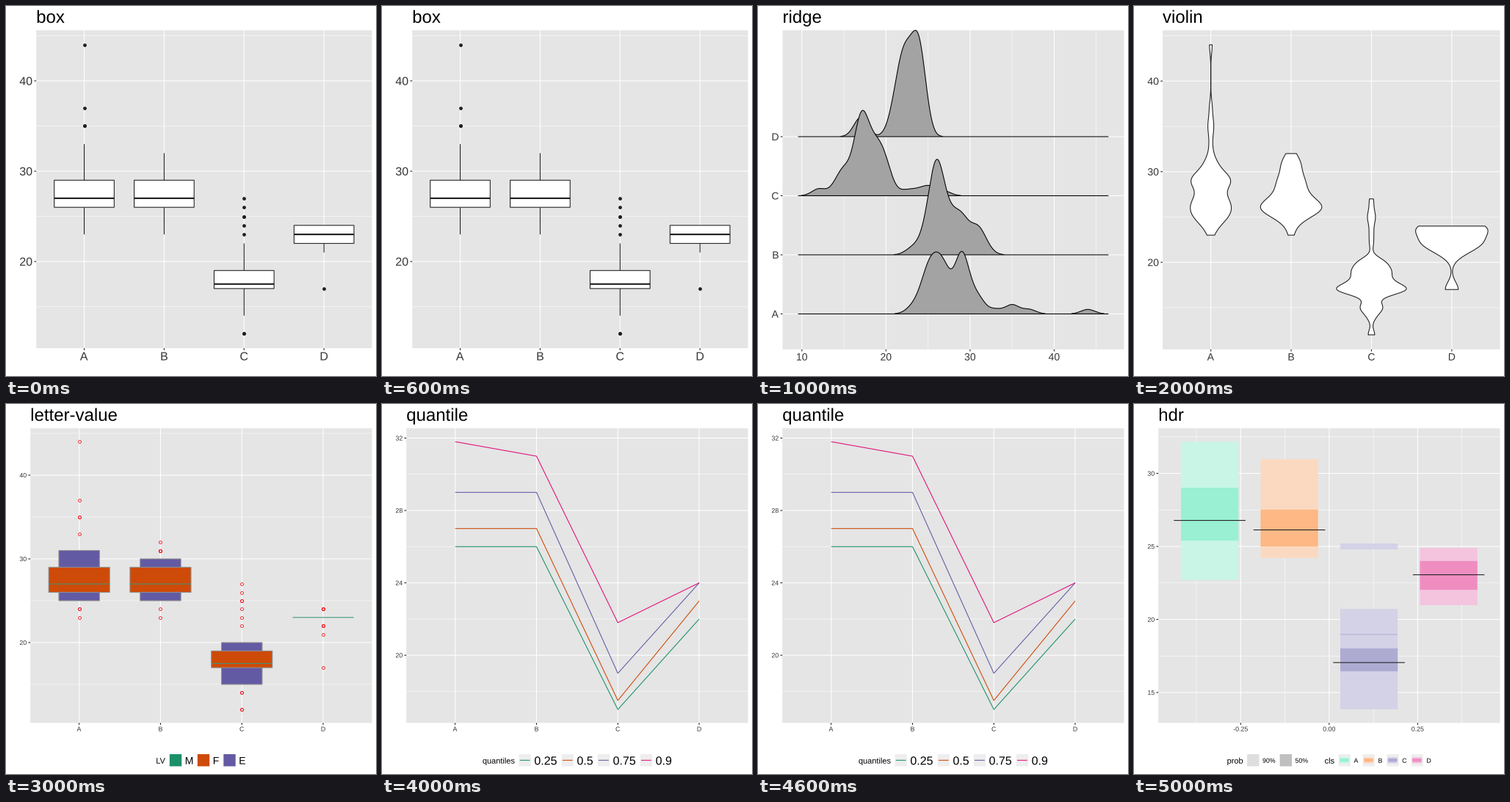
These frames come from a looping animation (504 by 504 pixels, 6 s). A matplotlib script:

```python
import numpy as np
import matplotlib.pyplot as plt
from matplotlib.animation import FuncAnimation
from matplotlib.colors import to_rgb
from matplotlib.patches import PathPatch, Polygon, Rectangle
from matplotlib.textpath import TextPath
from matplotlib.transforms import Affine2D

SIZE = 504
TOP, RIGHT = 33.1, 498.5
LINE, KEY = 1.07, 17.28
INK, TEXT, GREY, PALE = "#1f1f1f", "#363636", "#e5e5e5", "#eeeeee"
DARK = ["#1c9066", "#ce4a08", "#635aa4", "#e00f78"]
SOFT = ["#99f0d3", "#fdb886", "#aeabd3", "#ef8dc1"]

plt.rcParams.update({
    "font.family": "Liberation Sans",
    "path.snap": False,
    "lines.solid_capstyle": "butt",
})

# (rank, value) points; the sorted values between them are interpolated
POINTS = {
    "A": [(0, 23.2), (3, 24.55), (23, 27.43), (25, 28.6), (36, 29.4),
          (41, 31.4), (43, 35), (44, 35), (45, 37), (46, 44)],
    "B": [(0, 23), (1, 24.4), (5, 25.47), (19, 26.4), (33, 29.4),
          (36, 30.6), (40, 31.7)],
    "C": [(1, 12), (2, 14.15), (9, 15.45), (12, 16.6), (30, 17.45),
          (54, 20.28), (55, 22), (61, 27.2)],
    "D": [(0, 17), (1, 21.2), (9, 24.4), (10, 24.4)],
}
NAMES = list(POINTS)


def sample(points):
    rank, value = zip(*points)
    return np.round(np.interp(np.arange(rank[-1] + 1), rank, value))


DATA = [sample(p) for p in POINTS.values()]

fig = plt.figure(figsize=(7, 7), dpi=72, facecolor="white")
ax = fig.add_axes([0, 0, 1, 1])


def bandwidth(v):
    q1, q3 = np.percentile(v, [25, 75])
    return 0.9 * min(v.std(ddof=1), (q3 - q1) / 1.34) * len(v) ** -0.2


def density(v, x, bw):
    z = (x[:, None] - v) / bw
    return np.exp(-z * z / 2).sum(1) / (len(v) * bw * np.sqrt(2 * np.pi))


def scale(lo, hi, start, end):
    return lambda v: start + (v - lo) / (hi - lo) * (end - start)


def line(x, y, color=INK, lw=LINE, z=3):
    ax.plot(x, y, color=color, lw=lw, zorder=z)


def rect(x0, y0, x1, y1, fill, edge="none", lw=0.0, z=3):
    ax.add_patch(Rectangle((x0, y0), x1 - x0, y1 - y0, facecolor=fill,
                           edgecolor=edge, lw=lw, zorder=z))


def shape(x, y, fill, edge="none"):
    ax.add_patch(Polygon(np.column_stack([x, y]), closed=True, facecolor=fill,
                         edgecolor=edge, lw=LINE, zorder=3))


def label(x, y, s, size, color="black", align=0.0):
    """Text on baseline y; align 0 left, 0.5 centre, 1 right. Returns its end."""
    path = TextPath((0, 0), s, size=size)
    width = path.vertices[:, 0].max() + 0.05 * size
    x -= align * width
    move = Affine2D().scale(1, -1).translate(x, y)
    ax.add_patch(PathPatch(path, facecolor=color, lw=0, zorder=5,
                           transform=move + ax.transData))
    return x + width


def dots(x, ys, fill, edge):
    for y in ys:
        ax.plot([x], [y], "o", ms=3.9, mfc=fill, mec=edge, mew=0.75, zorder=4)


def panel(title, left, bottom, size, xticks, yticks, xminor=(), yminor=()):
    """Title, grey panel, grid, ticks and tick labels."""
    rect(left, TOP, RIGHT, bottom, GREY, z=0)
    for x in xminor:
        line([x, x], [TOP, bottom], "white", LINE / 2, 1)
    for y in yminor:
        line([left, RIGHT], [y, y], "white", LINE / 2, 1)
    for x, s in xticks:
        line([x, x], [TOP, bottom], "white", z=2)
        line([x, x], [bottom, bottom + 2.74])
        label(x, bottom + 4.94 + 0.72 * size, s, size, TEXT, 0.5)
    for y, s in yticks:
        line([left, RIGHT], [y, y], "white", z=2)
        line([left - 2.74, left], [y, y])
        label(left - 4.94, y + 0.358 * size, s, size, TEXT, 1)
    label(left, 22.9, title, 24)


def class_panel(title, left, bottom, size, lo=12, hi=44, major=(20, 41, 10)):
    """Panel with the groups along x; returns centres, step and y scale."""
    pad = 0.05 * (hi - lo)
    ys = scale(lo - pad, hi + pad, bottom, TOP)
    xs = scale(0.4, 4.6, left, RIGHT)
    centres = [xs(i + 1) for i in range(4)]
    ticks = np.arange(*major)
    half = major[2] / 2
    minor = [v for v in np.append(ticks - half, ticks[-1] + half)
             if lo - pad < v < hi + pad]
    panel(title, left, bottom, size, list(zip(centres, NAMES)),
          [(ys(v), str(v)) for v in ticks], yminor=[ys(v) for v in minor])
    return centres, xs(2) - xs(1), ys


def legend(x, title, names, size, paint):
    """One row: title, then a painted key and a name for every entry."""
    x = label(x, 489.7, title, 11) + 5
    for i, s in enumerate(names):
        paint(x, i)
        x = label(x + KEY + 4, 485.5 + 0.365 * size, s, size) + 5.5


def key(x, color):
    rect(x + 0.4, 477, x + KEY - 0.5, 493.5, color)


def box():
    centres, step, ys = class_panel("box", 41.2, 466.1, 16)
    half = 0.375 * step
    for x, v in zip(centres, DATA):
        q1, mid, q3 = np.percentile(v, [25, 50, 75])
        reach = 1.5 * (q3 - q1)
        far = (v < q1 - reach) | (v > q3 + reach)
        line([x, x], [ys(v[~far].min()), ys(q1)])
        line([x, x], [ys(q3), ys(v[~far].max())])
        rect(x - half, ys(q3), x + half, ys(q1), "white", INK, LINE)
        line([x - half, x + half], [ys(mid)] * 2, lw=2 * LINE, z=4)
        dots(x, ys(v[far]), INK, INK)


def ridge():
    left, bottom = 33.5, 467.7
    bw = np.mean([bandwidth(v) for v in DATA])
    lo, hi = 12 - 3 * bw, 44 + 3 * bw
    pad = 0.05 * (hi - lo)
    xs = scale(lo - pad, hi + pad, left, RIGHT)
    ys = scale(0.4, 5.8, bottom, TOP)
    panel("ridge", left, bottom, 14,
          [(xs(v), str(v)) for v in range(10, 41, 10)],
          [(ys(i + 1), s) for i, s in enumerate(NAMES)],
          xminor=[xs(v) for v in range(15, 46, 10)])
    grid = np.linspace(lo, hi, 512)
    curves = [density(v, grid, bw) for v in DATA]
    peak = np.max(curves)
    for i in (3, 2, 1, 0):
        base = ys(i + 1)
        y = ys(i + 1 + 1.8 * curves[i] / peak)
        shape(np.r_[xs(lo), xs(grid), xs(hi)], np.r_[base, y, base],
              "#a3a3a3")
        line([xs(lo), xs(hi)], [base, base], "black")
        # the flat tails are already covered by the base line
        line(xs(grid), np.where(base - y > 0.3, y, np.nan), "black")


def violin():
    centres, step, ys = class_panel("violin", 39.0, 467.7, 14)
    grids = [np.linspace(v.min(), v.max(), 512) for v in DATA]
    curves = [density(v, g, bandwidth(v)) for v, g in zip(DATA, grids)]
    peak = np.max(curves)
    for x, g, d in zip(centres, grids, curves):
        w = 0.45 * step * d / peak
        shape(np.r_[x - w, (x + w)[::-1]], np.r_[ys(g), ys(g)[::-1]],
              "white", INK)


def letter_bounds(v, depth):
    """Values at a depth counted from both ends."""
    k = np.array([np.floor(depth), np.ceil(depth)]).astype(int)
    return v[k - 1].mean(), v[len(v) - k].mean()


def letter_value():
    centres, step, ys = class_panel("letter-value", 33.2, 434.4, 8.8)
    for x, v in zip(centres, DATA):
        fourth = (1 + (1 + len(v)) // 2) / 2
        eighth = (1 + int(fourth)) / 2
        lo = hi = np.median(v)
        if len(v) > 20:
            for depth, color, part in ((eighth, DARK[2], 0.25),
                                       (fourth, DARK[1], 0.375)):
                a, b = letter_bounds(v, depth)
                rect(x - part * step, ys(b), x + part * step, ys(a), color,
                     "#8f8f8f", LINE)
            lo, hi = letter_bounds(v, eighth)
        half = 0.375 * step
        line([x - half, x + half], [ys(np.median(v))] * 2, "#3f9478", z=4)
        dots(x, ys(v[(v < lo) | (v > hi)]), "none", "#f5000c")
    legend(204.3, "LV", "MFE", 14, lambda x, i: key(x, DARK[i]))


def quantile():
    centres, _, ys = class_panel("quantile", 33.2, 434.4, 8.8,
                                 17, 31.8, (20, 33, 4))
    probs = [0.25, 0.5, 0.75, 0.9]
    for q, color in zip(probs, DARK):
        line(centres, [ys(np.quantile(v, q)) for v in DATA], color)

    def paint(x, i):
        key(x, PALE)
        line([x + 1.7, x + 15.5], [485.3, 485.3], DARK[i])

    legend(136.9, "quantiles", map(str, probs), 16, paint)


# per group: mode, 90 % regions, 50 % regions
REGIONS = [
    (26.78, [(22.7, 32.17)], [(25.4, 29.02)]),
    (26.13, [(24.22, 30.97)], [(25.0, 27.52)]),
    (17.05, [(13.85, 20.72), (24.8, 25.2)], [(16.45, 18.02), (18.95, 19.0)]),
    (23.06, [(20.98, 24.9)], [(22.03, 24.0)]),
]


def tint(color):
    return (np.array(to_rgb(color)) + 0.98) / 2


def hdr():
    xs = scale(-0.25, 0.25, 145.3, 386.4)
    ys = scale(15, 30, 393, 94.5)
    panel("hdr", 33.2, 434.4, 8.8,
          [(xs(v), f"{v:.2f}") for v in (-0.25, 0, 0.25)],
          [(ys(v), str(v)) for v in range(15, 31, 5)],
          xs(np.arange(-0.375, 0.4, 0.25)), ys(np.arange(17.5, 33, 5)))
    for i, (mode, wide, narrow) in enumerate(REGIONS):
        x = xs(-0.3375 + 0.225 * i)
        for spans, color in ((wide, tint(SOFT[i])), (narrow, SOFT[i])):
            for lo, hi in spans:
                rect(x - 39.1, ys(hi), x + 39.1, ys(lo), color)
        line([x - 48.8, x + 48.8], [ys(mode)] * 2, z=4)

    def paint(x, i):
        key(x, PALE)
        rect(x + 2, 481, x + 14.6, 489.4, tint(SOFT[i]))
        rect(x + 2, 483, x + 14.6, 487.4, SOFT[i])

    legend(126.6, "prob", ["90%", "50%"], 8.8,
           lambda x, i: key(x, ["#dedede", "#bfbfbf"][i]))
    legend(259.6, "cls", NAMES, 8.8, paint)


SCENES = [box, ridge, violin, letter_value, quantile, hdr]


def draw(i):
    ax.clear()
    ax.axis("off")
    ax.set_xlim(0, SIZE)
    ax.set_ylim(SIZE, 0)
    ax.set_autoscale_on(False)
    SCENES[i]()
    return []


anim = FuncAnimation(fig, draw, frames=len(SCENES), interval=1000,
                     init_func=lambda: draw(0), repeat=True, repeat_delay=0)
plt.show()
```
